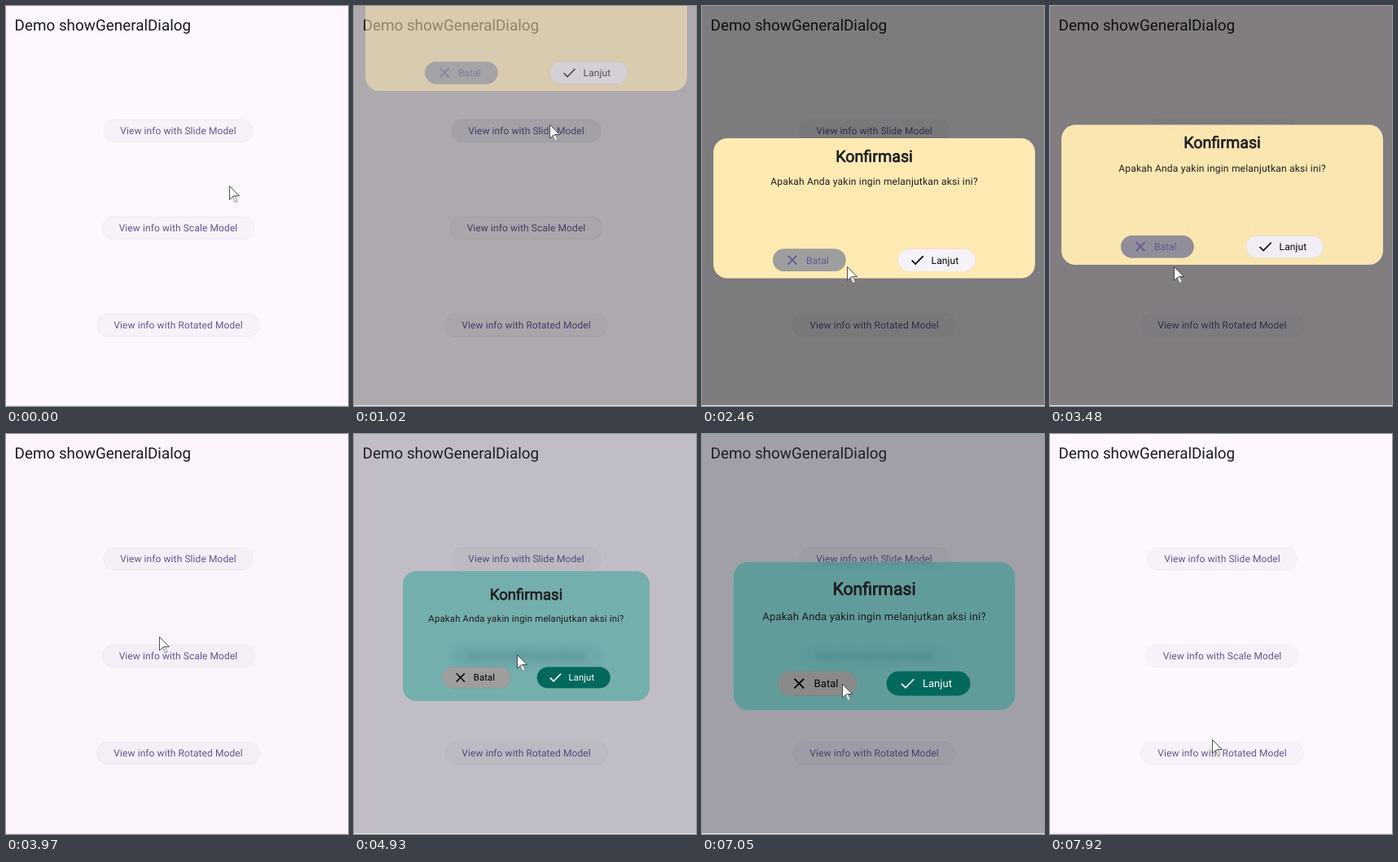
Animation of 420x490 px, one loop 8000 ms. Source, as an HTML page:

```html
<!DOCTYPE html>
<html lang="id">
<head>
<meta charset="utf-8">
<title>Dialog demo</title>
<style>
  html, body { margin: 0; width: 100%; height: 100%; overflow: hidden; background: #fef7ff; }
  svg { display: block; width: 420px; height: 490px; font-family: Roboto, sans-serif; text-rendering: geometricPrecision; }
  .label { font-size: 12px; letter-spacing: .086px; }
  .title { font-size: 19.7px; fill: #1d1b20; stroke: #1d1b20; stroke-width: .7; text-anchor: middle; }
  .body { font-size: 12px; letter-spacing: .214px; fill: #1d1b20; text-anchor: middle; }
  .pill { filter: drop-shadow(0 .8px .5px rgba(0, 0, 0, .24)); }
  .icon { fill: none; stroke-width: 1.7; }
</style>
</head>
<body>
<svg id="stage" viewBox="0 0 420 490">
  <defs>
    <clipPath id="hole"><rect id="holeRect"/></clipPath>
    <filter id="blur" filterUnits="userSpaceOnUse" x="0" y="0" width="420" height="490">
      <feGaussianBlur stdDeviation="4.2"/>
    </filter>
  </defs>
  <g id="page">
    <rect width="420" height="490" fill="#fef7ff"/>
    <text x="10.6" y="30" font-size="18.857" fill="#1d1b20">Demo showGeneralDialog</text>
    <g id="menu"></g>
  </g>
  <rect id="scrim" width="420" height="490"/>
  <g id="slide">
    <rect x="14" y="162" width="395" height="171.5" rx="17.2" fill="#feeab2"/>
    <text class="title" x="211.5" y="190.6">Konfirmasi</text>
    <text class="body" x="211.5" y="219.2">Apakah Anda yakin ingin melanjutkan aksi ini?</text>
  </g>
  <g id="glass" clip-path="url(#hole)">
    <use href="#page" filter="url(#blur)"/>
    <rect id="glassScrim" width="420" height="490"/>
    <rect width="420" height="490" fill="#009688" fill-opacity=".4"/>
  </g>
  <g id="scale">
    <text class="title" x="211.5" y="200.9">Konfirmasi</text>
    <text class="body" x="211.5" y="229">Apakah Anda yakin ingin melanjutkan aksi ini?</text>
  </g>
  <rect y="489" width="420" height="1" fill="#ece7ee"/>
  <g id="cursor" stroke-linejoin="round">
    <g id="arrow" fill="#fff" stroke-width=".8">
      <path d="M4.3 13.4L7.2 20.3L10 19.1L7.1 12.4Z" stroke="#777"/>
      <path d="M.5 .5V17.2L4.3 13.6L7.1 12.6H12.3Z" stroke="#222"/>
    </g>
    <g id="hand">
      <path d="M-1.4 1.6Q0 -.6 1.4 1.6V6.4Q2.8 5.6 3.9 6.9Q5.3 6.1 6.3 7.5Q8.4 7 8.6 9.2V13Q8.4 15.4 7.2 16.6V18.7H-.6V17L-3.7 12.2Q-4.4 10.4 -2.9 10.2L-1.4 11.5Z" fill="#fff" stroke="#111" stroke-width=".9"/>
      <path d="M1.4 6.4V9.8M3.9 6.9V9.8M6.3 7.5V9.8" fill="none" stroke="#111" stroke-width=".8"/>
    </g>
  </g>
</svg>
<script>
const LOOP = 8000, DURATION = 600;
const CENTER = { x: 211.5, y: 247.5 };
const $ = id => document.getElementById(id);
const clamp = v => Math.max(0, Math.min(1, v));

function el(parent, name, attrs, text) {
  const node = document.createElementNS('http://www.w3.org/2000/svg', name);
  for (const key in attrs) node.setAttribute(key, attrs[key]);
  if (text) node.textContent = text;
  parent.appendChild(node);
  return node;
}

// Adds a stadium button and returns its state overlay.
function pill(parent, x, cy, width, fill, tint) {
  const shape = { x, y: cy - 13.7, width, height: 27.4, rx: 13.7 };
  el(parent, 'rect', { ...shape, fill, class: 'pill' });
  return el(parent, 'rect', { ...shape, fill: tint, 'fill-opacity': 0 });
}

function menuButton(cy, width, text) {
  const overlay = pill($('menu'), CENTER.x - width / 2, cy, width, '#f7f2fa', '#65558f');
  el($('menu'), 'text', { class: 'label', x: CENTER.x, y: cy + 4.3, fill: '#65558f', 'text-anchor': 'middle' }, text);
  return overlay;
}

const ICONS = {
  cross: 'M-5.4 -5.4L5.4 5.4M5.4 -5.4L-5.4 5.4',
  check: 'M-7 .2L-2.5 4.8L7 -4.9'
};

function actionButton(parent, x, cy, width, text, icon, fill, ink, tint) {
  const overlay = pill(parent, x, cy, width, fill, tint);
  el(parent, 'path', { class: 'icon', d: ICONS[icon], stroke: ink, transform: `translate(${x + 24} ${cy})` });
  el(parent, 'text', { class: 'label', x: x + 41, y: cy + 4.3, fill: ink }, text);
  return overlay;
}

const overlays = {
  slideItem: menuButton(153, 183.4, 'View info with Slide Model'),
  scaleItem: menuButton(272, 187, 'View info with Scale Model'),
  rotateItem: menuButton(391, 199.6, 'View info with Rotated Model'),
  slideCancel: actionButton($('slide'), 87, 311.3, 89.6, 'Batal', 'cross', '#9e9e9e', '#65558f', '#65558f'),
  slideNext: actionButton($('slide'), 240.6, 311.3, 95.2, 'Lanjut', 'check', '#f7f2fa', '#000', '#65558f'),
  scaleCancel: actionButton($('scale'), 102, 301.4, 89.6, 'Batal', 'cross', '#9e9e9e', '#000', '#000'),
  scaleNext: actionButton($('scale'), 225.6, 301.4, 95.2, 'Lanjut', 'check', '#00695c', '#fff', '#fff')
};

// Each state: button, start, end, opacity
const STATES = [
  ['slideItem', 480, 1000, .06],
  ['slideNext', 1850, 2060, .08],
  ['slideCancel', 2480, 4000, .08],
  ['slideCancel', 3130, 4000, .13],
  ['scaleItem', 4050, 4800, .06],
  ['scaleItem', 4600, 4900, .08],
  ['scaleCancel', 5650, 7400, .05],
  ['scaleCancel', 6560, 7400, .08]
];

const PATH = [
  [0, 274, 220], [60, 274, 220], [380, 264, 180], [640, 241, 135], [830, 240, 145],
  [1640, 240, 145], [1900, 262, 305], [2100, 215, 335], [2250, 193, 325],
  [2340, 193, 325], [2600, 160, 313], [2700, 160, 313], [2870, 152, 316],
  [3400, 152, 316], [3480, 152, 319], [3970, 188, 248], [4180, 200, 270],
  [5140, 200, 270], [5340, 204, 300], [5540, 204, 300], [5740, 186, 307],
  [6090, 172, 307], [6780, 172, 306], [7710, 172, 306], [7920, 199, 374], [8000, 199, 374]
];
const HAND = [[480, 850], [1850, 2060], [2480, 3440], [4060, 4780], [5640, 6790]];

function bezier(x1, y1, x2, y2) {
  const at = (s, a, b) => 3 * (1 - s) ** 2 * s * a + 3 * (1 - s) * s * s * b + s ** 3;
  return x => {
    if (x <= 0 || x >= 1) return clamp(x);
    let lo = 0, hi = 1;
    for (let i = 0; i < 24; i++) {
      const mid = (lo + hi) / 2;
      if (at(mid, x1, x2) < x) lo = mid; else hi = mid;
    }
    return at(lo, y1, y2);
  };
}
const ease = bezier(.25, .1, .25, 1);
const easeOut = bezier(0, 0, .58, 1);
const easeOutBack = bezier(.175, .885, .32, 1.275);

const visit = (t, open, close, openTime = DURATION) =>
  clamp((t - open) / openTime) - clamp((t - close) / DURATION);
const show = (node, on) => node.setAttribute('display', on ? 'inline' : 'none');

function drawScrim(slideT, scaleT) {
  const color = scaleT > 0 ? '#202531' : '#000';
  const alpha = .5 * ease(scaleT > 0 ? scaleT : slideT);
  for (const node of [$('scrim'), $('glassScrim')]) {
    node.setAttribute('fill', color);
    node.setAttribute('fill-opacity', alpha);
  }
}

function drawSlide(p) {
  const v = easeOut(p);
  show($('slide'), p > 0);
  $('slide').setAttribute('transform', `translate(0 ${(v - 1) * 490})`);
  $('slide').setAttribute('opacity', v);
}

function drawScale(p) {
  const k = easeOutBack(p), { x, y } = CENTER;
  show($('glass'), p > 0);
  show($('scale'), p > 0);
  const box = { x: x - 160.5 * k, y: y - 84.3 * k, width: 321 * k, height: 168.6 * k, rx: 17.2 * k };
  for (const key in box) $('holeRect').setAttribute(key, box[key]);
  $('scale').setAttribute('transform', `translate(${x} ${y}) scale(${k}) translate(${-x} ${-y})`);
}

function drawStates(t) {
  const sums = {};
  for (const [name, from, to, alpha] of STATES) {
    const level = clamp((t - from) / 120) - clamp((t - to) / 120);
    sums[name] = (sums[name] || 0) + alpha * level;
  }
  for (const name in sums) overlays[name].setAttribute('fill-opacity', sums[name]);
}

function drawCursor(t) {
  let i = 1;
  while (i < PATH.length - 1 && PATH[i][0] < t) i++;
  const [t0, x0, y0] = PATH[i - 1], [t1, x1, y1] = PATH[i];
  const f = clamp((t - t0) / (t1 - t0));
  const x = Math.round(x0 + (x1 - x0) * f), y = Math.round(y0 + (y1 - y0) * f);
  $('cursor').setAttribute('transform', `translate(${x} ${y})`);
  const pointing = HAND.some(([from, to]) => t >= from && t < to);
  show($('hand'), pointing);
  show($('arrow'), !pointing);
}

function draw(t) {
  const slideT = visit(t, 815, 3395, 560);
  const scaleT = visit(t, 4740, 6777);
  drawScrim(slideT, scaleT);
  drawSlide(slideT);
  drawScale(scaleT);
  drawStates(t);
  drawCursor(t);
}

const start = performance.now();
function tick() {
  draw((performance.now() - start) % LOOP);
  requestAnimationFrame(tick);
}
tick();
</script>
</body>
</html>
```
